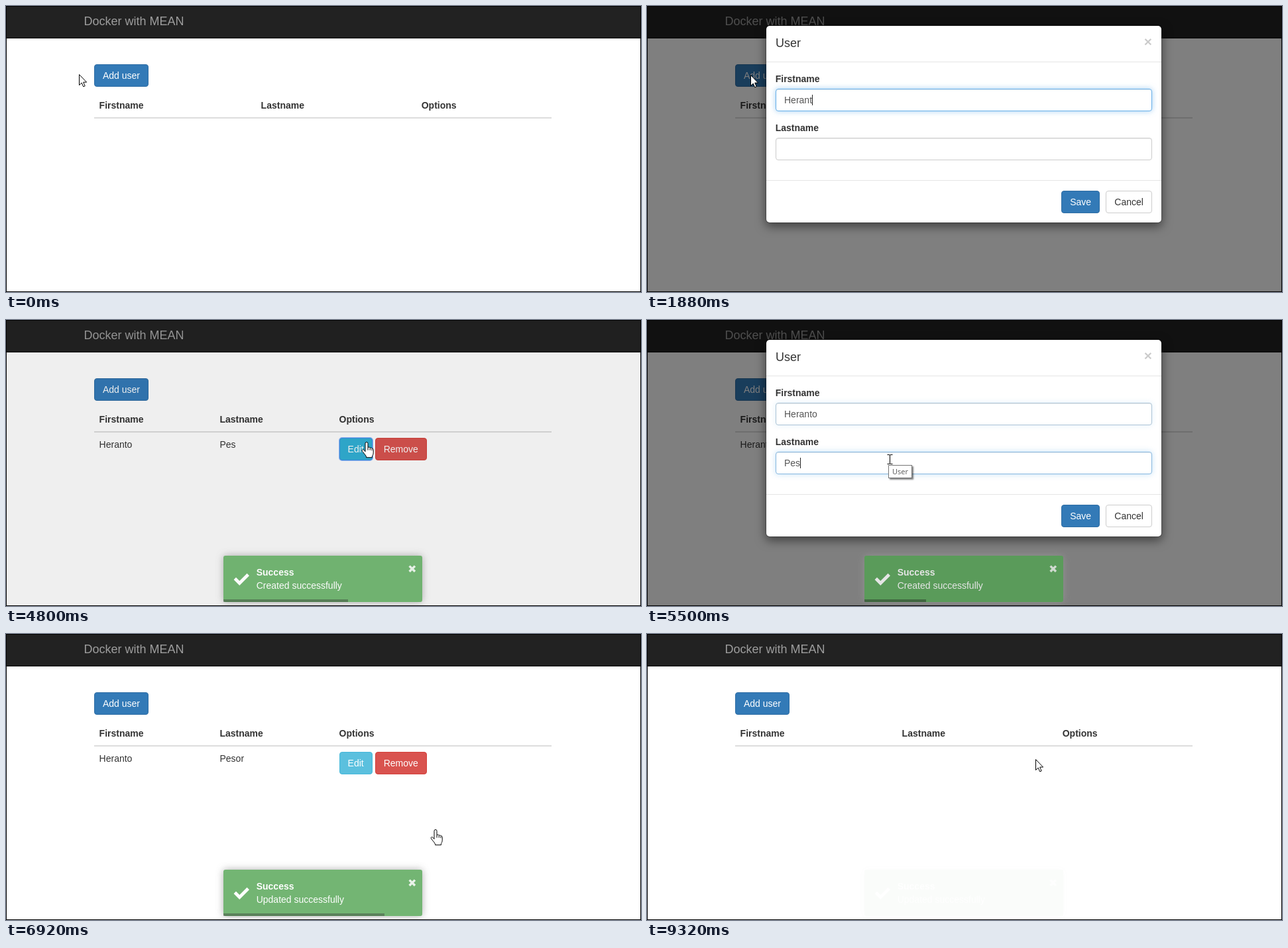
An HTML page for the animation above (9.43 s loop, 958x432 px).

```html
<!DOCTYPE html>
<html lang="en">
<head>
<meta charset="utf-8">
<title>Docker with MEAN</title>
<style>
* { box-sizing: border-box; }
html, body { margin: 0; width: 100%; height: 100%; overflow: hidden; background: #fff; }
#stage {
  position: relative; width: 958px; height: 432px; overflow: hidden; background: #fff;
  font: 14px/20px "Liberation Sans", Arial, sans-serif; color: #333;
}
#stage div, #stage span, #stage svg { position: absolute; white-space: pre; }
#frame { inset: 0; border: 1px solid #000; }
#nav { left: 0; top: 0; width: 958px; height: 49px; background: #222; border-bottom: 1px solid #080808; }
#brand { left: 117.5px; top: 10px; font-size: 18px; line-height: 26px; color: #9d9d9d; }
b { font-weight: 700; }
#rule { left: 133px; top: 168px; width: 690px; height: 2px; background: #ddd; }
#stage .btn {
  height: 34px; padding: 6px 12px; border: 1px solid; border-radius: 4px; color: #fff;
}
.primary { background: #337ab7; border-color: #2e6da4 !important; }
.primary.hover { background: #286090; border-color: #204d74 !important; }
.info { background: #5bc0de; border-color: #46b8da !important; }
.info.hover { background: #31b0d5; border-color: #269abc !important; }
.danger { background: #d9534f; border-color: #d43f3a !important; }
.danger.hover { background: #c9302c; border-color: #ac2925 !important; }
#stage .plain { background: #fff; border-color: #ccc; color: #333; }
.focus { outline: 2px solid rgba(77, 144, 254, .6); outline-offset: -1px; }
#shade { inset: 0; background: #000; }
#modal {
  left: 179px; top: 29px; width: 598px; height: 299px; background: #fff; background-clip: padding-box;
  border: 1px solid rgba(0, 0, 0, .2); border-radius: 6px; box-shadow: 0 5px 15px rgba(0, 0, 0, .5);
}
/* children of the modal use stage coordinates */
#inner { left: -180px; top: -30px; }
#inner .line { left: 180px; width: 596px; height: 1px; background: #e5e5e5; }
#title { left: 194px; top: 43px; font-size: 18px; line-height: 26px; }
#close { left: 749.7px; top: 43px; font: bold 21px/21px "Liberation Sans", Arial, sans-serif; color: #000; opacity: .2; }
.field {
  left: 194px; width: 568px; height: 34px; border: 1px solid #ccc; border-radius: 4px;
  background: #fff; color: #555;
}
.field span { left: 12px; top: 6px; min-height: 20px; }
.field i { position: absolute; left: 100%; top: 2px; width: 1px; height: 16px; background: #222; }
#tip {
  left: 364px; top: 219px; width: 36px; height: 20px; border: 1px solid #767676; background: #fff;
  font: 11px/18px "Open Sans", "Noto Sans", sans-serif; color: #575757; padding-left: 5px;
  box-shadow: 2px 2px 2px rgba(0, 0, 0, .5);
}
#toast {
  left: 328px; top: 356px; width: 300px; height: 70px; border-radius: 3px; background: #51a351;
  color: #fff; box-shadow: 0 0 12px #999; overflow: visible;
}
#bar { left: 0; bottom: 0; height: 4px; background: #000; opacity: .4; }
#cursor { left: 0; top: 0; overflow: visible; }
</style>
</head>
<body>
<div id="stage">
  <div id="nav"><span id="brand">Docker with MEAN</span></div>
  <div id="add" class="btn primary" style="left:133px;top:88px">Add user</div>
  <span style="left:140.6px;top:140px"><b>Firstname</b></span>
  <span id="lastHead" style="top:140px"><b>Lastname</b></span>
  <span id="optHead" style="top:140px"><b>Options</b></span>
  <div id="rule"></div>
  <div id="row">
    <span style="left:140.6px;top:178px">Heranto</span>
    <span id="lastCell" style="left:322.5px;top:178px"></span>
    <div id="edit" class="btn info" style="left:502.6px;top:178px">Edit</div>
    <div id="remove" class="btn danger" style="left:556.7px;top:178px">Remove</div>
  </div>

  <div id="shade"></div>
  <div id="modal"><div id="inner">
    <span id="title">User</span><span id="close">×</span>
    <div class="line" style="top:84px"></div>
    <span style="left:193.7px;top:100px"><b>Firstname</b></span>
    <div id="first" class="field" style="top:125px"><span></span></div>
    <span style="left:193.7px;top:174px"><b>Lastname</b></span>
    <div id="last" class="field" style="top:199px"><span></span></div>
    <div class="line" style="top:263px"></div>
    <div id="save" class="btn primary" style="left:625.2px;top:279px">Save</div>
    <div class="btn plain" style="left:692.3px;top:279px">Cancel</div>
  </div></div>
  <div id="tip">User</div>

  <div id="toast">
    <svg width="300" height="70" style="left:0;top:0" fill="none" stroke="#fff">
      <path d="M17.3 34.5l7 7 13-13" stroke-width="4.8"/>
      <path d="M280.6 15.6l8.4 8.4m0-8.4l-8.4 8.4" stroke-width="3.4" opacity=".85"/>
    </svg>
    <span style="left:49.7px;top:15px"><b>Success</b></span>
    <span id="msg" style="left:49.7px;top:35px"></span>
    <div id="bar"></div>
  </div>

  <svg id="cursor" width="1" height="1" stroke="#000" fill="#fff">
    <path id="arrow" d="M.5 .5V16.6L4.2 13.1 6.7 18.8 9.2 17.8 6.7 12.1H11.6Z"/>
    <path id="hand" transform="translate(-7.5 .2)" stroke-linejoin="round" d="M5.5 14.5V2.3a2 2 0 0 1 4 0V8.5c.8-1 3-.7 3.2.6 1-.8 2.6-.3 2.8.9.9-.5 2.2 0 2.2 1.3V16c0 3-1 4-1.8 5.5V23.5H7V22C5.5 19 3 17 .8 13.5c-.6-1.4 1-2.8 2.4-1.6ZM9.5 8.5V12.5M12.7 9.5V12.5M15.5 10.5V13"/>
    <path id="beam" fill="none" d="M-3.5 -6.5H-1Q.5 -6.5 .5 -5.5Q.5 -6.5 2 -6.5H4.5M.5 -6V7M-3.5 7.5H-1Q.5 7.5 .5 6.5Q.5 7.5 2 7.5H4.5"/>
  </svg>
  <div id="frame"></div>
</div>

<script>
const LOOP = 9430;
const $ = id => document.getElementById(id);
const clamp = v => Math.min(1, Math.max(0, v));
const within = (t, a, b) => t >= a && t < b;
const show = (id, on) => { $(id).style.display = on ? "" : "none"; };

// modal sessions: opening and closing time
const dialogs = [[300, 3936], [4782, 6400]];
const OPEN_DELAY = 100, RISE = 74.75;

// toasts: start, end of the progress bar, fade-out length, text
const toasts = [
  [3972, 6190, 230, "Created successfully"],
  [6423, 9040, 290, "Updated successfully"]
];

const ROW_ADDED = 3936, ROW_REMOVED = 7650, POINTER_RESET = 8450;
const firstKeys = [1020, 1260, 1370, 1540, 1600, 1880, 2110];
const lastKeys = [2620, 2790, 2850, 5720, 5900];
const TAB = 2390, PICK = 5400;

// pointer stops: time, x, y
const stops = [
  [40, 110, 103], [260, 156, 104], [3260, 156, 104], [3740, 652, 294],
  [4230, 652, 294], [4680, 544, 184], [5180, 544, 184], [5390, 366, 210],
  [5960, 366, 210], [6300, 648, 295], [7130, 648, 295], [7460, 586, 189]
];

// hit areas: x, y, width, height
const areas = {
  add: [133, 88, 82, 34], edit: [503, 178, 50, 34], remove: [557, 178, 78, 34],
  first: [194, 125, 568, 34], last: [194, 199, 568, 34], save: [625, 279, 58, 34]
};

// CSS ease-out, cubic-bezier(0, 0, .58, 1)
function easeOut(x) {
  x = clamp(x);
  let lo = 0, hi = 1;
  for (let i = 0; i < 16; i++) {
    const u = (lo + hi) / 2;
    if (1.74 * u * u - .74 * u * u * u < x) lo = u; else hi = u;
  }
  return 3 * lo * lo - 2 * lo * lo * lo;
}

const typed = (text, keys, t) => text.slice(0, keys.filter(k => k <= t).length);

function pointerAt(t) {
  const i = stops.findIndex(s => s[0] > t);
  if (i === 0) return stops[0].slice(1);
  if (i < 0) return stops[stops.length - 1].slice(1);
  const [t0, x0, y0] = stops[i - 1], [t1, x1, y1] = stops[i];
  const p = (t - t0) / (t1 - t0), k = p * p * (3 - 2 * p);
  return [x0 + (x1 - x0) * k, y0 + (y1 - y0) * k];
}

function hit(ids, x, y) {
  return ids.find(id => {
    const [l, top, w, h] = areas[id];
    return within(x, l, l + w) && within(y, top, top + h);
  });
}

function drawPage(t) {
  const hasRow = within(t, ROW_ADDED, ROW_REMOVED);
  show("row", hasRow);
  $("lastHead").style.left = (hasRow ? 322.5 : 384.6) + "px";
  $("optHead").style.left = (hasRow ? 502.6 : 626.7) + "px";
  $("lastCell").textContent = t < dialogs[1][1] ? "Pes" : "Pesor";
}

function drawField(id, text, glow) {
  const field = $(id), mix = (a, b) => Math.round(a + (b - a) * glow);
  field.style.borderColor = `rgb(${mix(204, 102)},${mix(204, 175)},${mix(204, 233)})`;
  field.style.boxShadow =
    `inset 0 1px 1px rgba(0,0,0,.075), 0 0 8px rgba(102,175,233,${.6 * glow})`;
  const span = field.firstElementChild;
  span.textContent = text;
  if (glow > .5) span.append(document.createElement("i"));
}

function drawDialog(t) {
  const [start, end] = dialogs[t < dialogs[1][0] ? 0 : 1];
  const opened = t - start - OPEN_DELAY, closed = t - end;
  $("shade").style.opacity = .5 * Math.min(clamp((t - start) / 150), clamp(1 - (closed - 300) / 150));
  const alpha = Math.min(clamp(opened / 150), clamp(1 - closed / 150));
  const lift = closed > 0 ? easeOut(closed / 300) : 1 - easeOut(opened / 300);
  $("modal").style.opacity = alpha;
  $("modal").style.transform = `translateY(${-RISE * lift}px)`;
  show("modal", alpha > 0);

  const focusAt = start + 280, swap = start < TAB ? TAB : PICK;
  const toLast = clamp((t - swap) / 150), blur = 1 - clamp((t - end + 200) / 150);
  drawField("first", typed("Heranto", firstKeys, t), Math.min(clamp((t - focusAt) / 150), 1 - toLast));
  drawField("last", typed("Pesor", lastKeys, t), Math.min(toLast, blur));
  show("tip", within(t, 5450, lastKeys[3]));
}

function drawToast(t) {
  const toast = toasts.filter(s => s[0] <= t).pop();
  show("toast", toast);
  if (!toast) return;
  const [start, end, fade, text] = toast;
  $("toast").style.opacity = .8 * Math.min(clamp((t - start) / 300), clamp(1 - (t - end) / fade));
  $("msg").textContent = text;
  $("bar").style.width = 300 * clamp((end - t) / (end - start)) + "px";
}

function drawPointer(t) {
  const [x, y] = pointerAt(t);
  const inDialog = dialogs.some(([a, b]) => within(t, a + 90, b));
  const covered = dialogs.some(([a, b]) => within(t, a + 90, b + 450));
  let over, shape = "arrow";
  if (inDialog) over = hit(["first", "last", "save"], x, y);
  else if (!covered) over = hit(t < ROW_ADDED ? ["add"] : ["add", "edit", "remove"], x, y);
  if (over) shape = over === "first" || over === "last" ? "beam" : "hand";
  // the hand lingers until the mouse moves again
  if (within(t, dialogs[1][1], 7130)) shape = "hand";
  if (t >= POINTER_RESET) shape = "arrow";

  for (const id of ["arrow", "hand", "beam"]) show(id, id === shape);
  $("cursor").style.transform = `translate(${Math.round(x)}px,${Math.round(y)}px)`;

  const saving = dialogs.some(([, b]) => within(t, b - 80, b + 150));
  for (const id of ["add", "edit", "remove", "save"])
    $(id).classList.toggle("hover", id === over || (id === "save" && saving));
  $("save").classList.toggle("focus", saving);
  $("edit").classList.toggle("focus", within(t, 4740, dialogs[1][1]));
  $("remove").classList.toggle("focus", within(t, 7560, ROW_REMOVED));
}

function render(t) {
  drawPage(t);
  drawDialog(t);
  drawToast(t);
  drawPointer(t);
}

const begin = performance.now();
function tick() {
  render((performance.now() - begin) % LOOP);
  requestAnimationFrame(tick);
}
tick();
</script>
</body>
</html>
```
